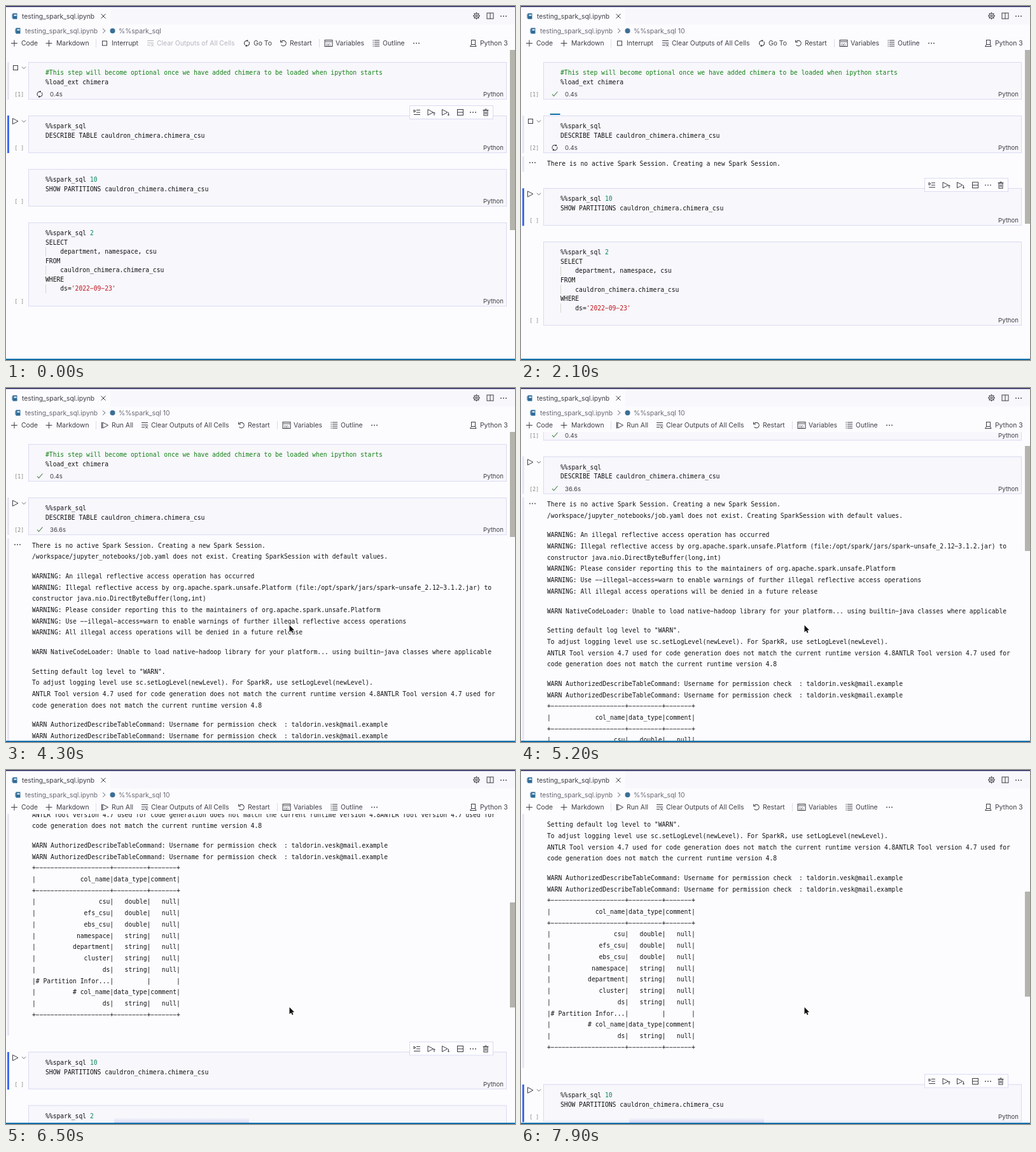
An HTML page with a canvas for the animation above (8 s loop, 800 by 556 pixels).

```html
<!DOCTYPE html>
<html lang="en">
<head>
<meta charset="utf-8">
<title>Notebook run</title>
<style>
html, body { margin: 0; width: 100%; height: 100%; overflow: hidden; background: #fcfcff; }
canvas { display: block; width: 800px; height: 556px; }
</style>
</head>
<body>
<canvas id="stage" width="800" height="556"></canvas>
<script>
const ctx = document.getElementById('stage').getContext('2d');
const LOOP = 8000, STEP = 100;
const VIEW = { top: 69, bottom: 554 };
const CODE = '9.68px "DejaVu Sans Mono", monospace';
const LABEL = '10.35px Inter, sans-serif';
const SMALL = '9.6px Inter, sans-serif';
const CHAR = 5.828, CODE_LINE = 14.55, OUT_LINE = 17.72, OUT_GAP = 30.6;
const C = {
  page: '#fcfcff', cell: '#f7f7fc', edge: '#dadaf2', ink: '#111', label: '#3d3d45',
  muted: '#666670', faint: '#b5b5bd', blue: '#3f6bf0', focus: '#86b5f2', bar: '#e6e6f6',
  accent: '#0e6fa8', green: '#138013', number: '#098658', string: '#c0141c', thumb: '#b4b4ad'
};

// Moments of the run, in ms
const T = { firstDone: 200, pointer: 900, click: 1100, run: 1700, progress: 2000, rush: 3300, done: 3800, arrow: 3700 };
const REVEAL = [[1900, 1], [2200, 2], [3300, 8], [3400, 13], [3500, 15], [3600, 29]];
const SCROLL = [[4900, 0], [5000, 8], [5100, 30], [5200, 64.5], [5300, 135], [5400, 220], [5500, 300],
  [5600, 360], [5700, 395], [6100, 395], [6300, 405], [6500, 410.5], [6700, 396], [7000, 359.5]];

const user = 'taldorin.vesk@mail.example';
const check = 'WARN AuthorizedDescribeTableCommand: Username for permission check  : ' + user;
const rule = '+' + [20, 9, 7].map(n => '-'.repeat(n)).join('+') + '+';
const row = (a, b, c) => '|' + a.padStart(20) + '|' + b.padStart(9) + '|' + c.padStart(7) + '|';
const header = row('col_name', 'data_type', 'comment');
const numbers = ['csu', 'efs_csu', 'ebs_csu'].map(n => row(n, 'double', 'null'));
const strings = ['namespace', 'department', 'cluster', 'ds'].map(n => row(n, 'string', 'null'));

// A leading newline marks a paragraph gap
const OUTPUT = [
  'There is no active Spark Session. Creating a new Spark Session.',
  '/workspace/jupyter_notebooks/job.yaml does not exist. Creating SparkSession with default values.',
  '\nWARNING: An illegal reflective access operation has occurred',
  'WARNING: Illegal reflective access by org.apache.spark.unsafe.Platform (file:/opt/spark/jars/spark-unsafe_2.12-3.1.2.jar) to',
  'constructor java.nio.DirectByteBuffer(long,int)',
  'WARNING: Please consider reporting this to the maintainers of org.apache.spark.unsafe.Platform',
  'WARNING: Use --illegal-access=warn to enable warnings of further illegal reflective access operations',
  'WARNING: All illegal access operations will be denied in a future release',
  '\nWARN NativeCodeLoader: Unable to load native-hadoop library for your platform... using builtin-java classes where applicable',
  '\nSetting default log level to "WARN".',
  'To adjust logging level use sc.setLogLevel(newLevel). For SparkR, use setLogLevel(newLevel).',
  'ANTLR Tool version 4.7 used for code generation does not match the current runtime version 4.8ANTLR Tool version 4.7 used for',
  'code generation does not match the current runtime version 4.8',
  '\n' + check, check,
  rule, header, rule, ...numbers, ...strings,
  '|# Partition Infor...|         |       |',
  row('# col_name', 'data_type', 'comment'), row('ds', 'string', 'null'), rule
];
let outY = 247 - OUT_LINE;
const LINES = OUTPUT.map(s => ({ text: s.trimStart(), y: outY += s[0] === '\n' ? OUT_GAP : OUT_LINE }));

// Each line is a list of [text, colour] runs
const plain = s => [[s, C.ink]];
const CELLS = [
  [[['#This step will become optional once we have added chimera to be loaded when ipython starts', C.green]],
    plain('%load_ext chimera')],
  [plain('%%spark_sql'), plain('DESCRIBE TABLE cauldron_chimera.chimera_csu')],
  [[['%%spark_sql ', C.ink], ['10', C.number]], plain('SHOW PARTITIONS cauldron_chimera.chimera_csu')],
  [[['%%spark_sql ', C.ink], ['2', C.number]], plain('SELECT'), plain('    department, namespace, csu'),
    plain('FROM'), plain('    cauldron_chimera.chimera_csu'), plain('WHERE'),
    [['    ds=', C.ink], ["'2022-09-23'", C.string]]]
];
const cellHeight = lines => 59 + (lines.length - 2) * CODE_LINE;

function lerpKeys(keys, t) {
  if (t <= keys[0][0]) return keys[0][1];
  for (let i = 1; i < keys.length; i++) {
    const [a, va] = keys[i - 1], [b, vb] = keys[i];
    if (t <= b) return va + (vb - va) * (t - a) / (b - a);
  }
  return keys[keys.length - 1][1];
}

function rect(x, y, w, h, color) {
  ctx.fillStyle = color;
  ctx.fillRect(x, y, w, h);
}
function frame(x, y, w, h, color) {
  ctx.strokeStyle = color;
  ctx.lineWidth = 1;
  ctx.strokeRect(x, y, w, h);
}
// Text is placed by the middle of its capitals
function text(s, x, y, font = LABEL, color = C.label) {
  ctx.font = font;
  ctx.fillStyle = color;
  ctx.fillText(s, x, y + 3.5);
}
// The code face has wide dashes, level with the plus sign
function code(s, x, y, color = C.ink) {
  text(s.replaceAll('-', '\u2212'), x, y, CODE, color);
}
function path(points, color = C.label, close = false, width = 1) {
  ctx.beginPath();
  points.forEach(([x, y]) => ctx.lineTo(x, y));
  if (close) ctx.closePath();
  ctx.strokeStyle = color;
  ctx.lineWidth = width;
  ctx.stroke();
}
function disc(x, y, r, color) {
  ctx.beginPath();
  ctx.arc(x, y, r, 0, 7);
  ctx.fillStyle = color;
  ctx.fill();
}
function arc(x, y, r, from, to, color = C.label) {
  ctx.beginPath();
  ctx.arc(x, y, r, from, to);
  ctx.strokeStyle = color;
  ctx.lineWidth = 1.1;
  ctx.stroke();
}

const icon = {
  plus(x, y) { path([[x - 5, y], [x + 5, y]]); path([[x, y - 5], [x, y + 5]]); },
  play(x, y) { path([[x - 4, y - 4.5], [x + 4.5, y], [x - 4, y + 4.5]], C.label, true); },
  stop(x, y) { frame(x - 3.5, y - 3.5, 7, 7, C.label); },
  close(x, y) { path([[x - 3.5, y - 3.5], [x + 3.5, y + 3.5]]); path([[x + 3.5, y - 3.5], [x - 3.5, y + 3.5]]); },
  down(x, y) { path([[x - 3, y - 1.5], [x, y + 1.5], [x + 3, y - 1.5]], C.muted); },
  right(x, y) { path([[x - 2, y - 3.5], [x + 2, y], [x - 2, y + 3.5]], C.muted); },
  tick(x, y) { path([[x - 4, y], [x - 1.5, y + 3], [x + 4.5, y - 4]], '#477a47', false, 1.1); },
  dots(x, y) { for (const d of [-4, 0, 4]) disc(x + d, y, 0.9, C.label); },
  sync(x, y, angle = 0) {
    arc(x, y, 4, angle + 2.4, angle + 4.9);
    arc(x, y, 4, angle - 0.7, angle + 1.8);
    for (const a of [angle + 4.9, angle + 1.8]) disc(x + 4 * Math.cos(a), y + 4 * Math.sin(a), 1.3, C.label);
  },
  restart(x, y) {
    arc(x, y, 4.2, -2.5, 2.5);
    path([[x - 4.5, y - 5], [x - 4.5, y - 1.5], [x - 1, y - 1.5]]);
  },
  clear(x, y, color) {
    path([[x - 5, y - 4], [x + 5, y - 4]], color);
    path([[x - 5, y - 0.5], [x + 5, y - 0.5]], color);
    path([[x - 5, y + 3], [x, y + 3]], color);
    path([[x + 1, y + 1], [x + 5, y + 5]], color);
    path([[x + 5, y + 1], [x + 1, y + 5]], color);
  },
  variables(x, y) {
    frame(x - 5.5, y - 5, 12, 10, C.label);
    path([[x - 5, y - 2.5], [x + 6, y - 2.5]]);
    text('(x)', x - 4, y + 1, '6px Inter, sans-serif');
  },
  outline(x, y) {
    for (const d of [-4, -1, 2, 5]) {
      rect(x - 5, y + d - 1, 1.5, 1, C.label);
      rect(x - 2.5, y + d - 1, 8, 1, C.label);
    }
  },
  notebook(x, y) {
    rect(x - 3.5, y - 4.5, 7, 9, '#2c6b98');
    rect(x - 1.5, y - 2.5, 4, 2, '#fff');
    rect(x - 4.5, y - 3, 1, 6, '#2c6b98');
  },
  gear(x, y) {
    arc(x, y, 3.7, 0, 7);
    arc(x, y, 1.5, 0, 7);
    for (let i = 0; i < 8; i++) {
      const c = Math.cos(i * Math.PI / 4), s = Math.sin(i * Math.PI / 4);
      path([[x + 3.7 * c, y + 3.7 * s], [x + 5.4 * c, y + 5.4 * s]], C.label, false, 1.5);
    }
  },
  split(x, y) { frame(x - 4.5, y - 4.5, 10, 9, C.label); path([[x + 0.5, y - 4.5], [x + 0.5, y + 4.5]]); },
  kernel(x, y) {
    frame(x - 2.5, y - 5, 6, 7, C.label);
    path([[x - 2.5, y + 2], [x - 4.5, y + 5], [x + 5, y + 5], [x + 3.5, y + 2]]);
  },
  trash(x, y) {
    frame(x - 3, y - 3, 6, 8, C.label);
    path([[x - 4.5, y - 3.5], [x + 4.5, y - 3.5]]);
    path([[x - 1.5, y - 5], [x + 1.5, y - 5]]);
    path([[x - 1, y - 1], [x - 1, y + 3]]);
    path([[x + 1, y - 1], [x + 1, y + 3]]);
  },
  runBy(x, y) {
    for (const d of [-3.5, 0, 3.5]) path([[x - (d > 0 ? 5 : 1), y + d], [x + 5, y + d]]);
    path([[x - 5, y - 4], [x - 2, y - 2], [x - 5, y]], C.label, true);
  },
  runPart(x, y, dir) {
    icon.play(x - 1, y);
    path([[x + 5, y], [x + 5, y + 5]]);
    path([[x + 3.5, y + 2.5 + dir], [x + 5, y + 2.5 + dir * 2.5], [x + 6.5, y + 2.5 + dir]]);
  }
};

function drawHeader(t, busy) {
  rect(0, 0, 800, VIEW.top, C.page);
  rect(164, 2, 636, 27, C.cell);
  rect(0, 0, 800, 1.5, '#20205a');
  icon.notebook(14, 16);
  text('testing_spark_sql.ipynb', 25, 16);
  icon.close(153, 16);
  icon.gear(739.5, 15.5);
  icon.split(760.5, 15.5);
  icon.dots(782, 16);

  icon.notebook(19, 39);
  text('testing_spark_sql.ipynb', 30, 39, LABEL, C.muted);
  icon.right(154, 39);
  disc(167.5, 39, 4, '#3a6f96');
  text(t < T.run ? '%%spark_sql' : '%%spark_sql 10', 177, 39, LABEL, C.muted);

  const y = 58.5, separator = x => rect(x, 52, 1, 13, '#dcdce6');
  const clearColor = t < REVEAL[0][0] ? C.faint : C.label;
  icon.plus(13, y); text('Code', 24, y);
  icon.plus(67.5, y); text('Markdown', 79, y);
  separator(141);
  if (busy) { icon.stop(155, y); text('Interrupt', 166, y); }
  else {
    icon.play(156, y); path([[150.5, 53.5], [150.5, 63.5]]);
    text('Run All', 166, y);
  }
  const clearX = busy ? 227 : 218;
  icon.clear(clearX, y, clearColor);
  text('Clear Outputs of All Cells', clearX + 10, y, LABEL, clearColor);
  if (busy) { icon.sync(378.5, y); text('Go To', 389, y); }
  const shift = busy ? 66 : 0;
  icon.restart(370 + shift, y); text('Restart', 380 + shift, y);
  separator(426 + shift);
  icon.variables(440.5 + shift, y); text('Variables', 452 + shift, y);
  icon.outline(515.5 + shift, y); text('Outline', 526 + shift, y);
  icon.dots(579 + shift, y);
  icon.kernel(734, y); text('Python 3', 745, y);
}

function drawCellTools(top) {
  const y = top - 5;
  rect(634, top - 16, 132, 22, '#fdfdff');
  frame(634.5, Math.round(top - 16) + 0.5, 131, 21, C.edge);
  icon.runBy(646, y);
  icon.runPart(668, y, -1);
  icon.runPart(690.5, y, 1);
  frame(709.5, y - 4.5, 9, 9, C.label); path([[709.5, y], [718.5, y]]);
  icon.dots(734, y);
  icon.trash(754, y);
}

// state: running, selected, hover, focused, order, time
function drawCell(lines, top, state) {
  const h = cellHeight(lines), y0 = Math.round(top) + 0.5;
  rect(35, top, 752, h, C.cell);
  frame(35.5, y0, 751, Math.round(h) - 1, state.focused ? C.focus : C.edge);
  if (state.selected) rect(2, top, 3, h, C.blue);
  else if (state.running || state.hover) rect(2, top, 3, h, C.bar);

  lines.forEach((runs, i) => {
    const y = top + 16.5 + i * CODE_LINE;
    let x = 62;
    if (runs[0][0].startsWith('  ')) rect(62, y - 7, 1, CODE_LINE, '#d8d8cc');
    for (const [s, color] of runs) {
      code(s, x, y, color);
      x += s.length * CHAR;
    }
  });

  if (state.running || state.selected || state.hover) {
    if (state.running) icon.stop(15, top + 9);
    else icon.play(14.5, top + 9);
    icon.down(28, top + 9);
  }
  const y = top + h - 8.5;
  text(`[${state.order || ' '}]`, 13.5, y, '8px "DejaVu Sans Mono", monospace', '#85857a');
  text('Python', 750, y, SMALL, C.label);
  if (state.time) {
    if (state.running) icon.sync(53, y, state.spin);
    else icon.tick(53, y);
    text(state.time, 69, y, SMALL, C.label);
  }
}

// Bit travels the cell width in 4 s, three times as wide at the middle
function drawProgress(seconds, top) {
  const p = seconds / 4 % 1, w = 15 * (3 - 2 * Math.abs(2 * p - 1));
  rect(42.5 + 737 * p - w / 2, top - 3, w, 2, C.accent);
}

function drawPointer(t) {
  if (t >= T.pointer && t < T.run) {
    path([[163, 183.5], [165, 183.5]]); path([[166, 183.5], [168, 183.5]]);
    path([[165.5, 184], [165.5, 194]], '#222');
    path([[163, 194.5], [165, 194.5]]); path([[166, 194.5], [168, 194.5]]);
  }
  if (t < T.arrow) return;
  const tip = [[0, 0], [0, 11], [2.6, 8.6], [4.3, 12.2], [6, 11.4], [4.4, 8], [7.6, 7.8]];
  path(tip.map(([x, y]) => [x + 445.5, y + 372.5]), '#fff', true, 2);
  ctx.fillStyle = '#111';
  ctx.fill();
}

function draw(t) {
  const running1 = t < T.firstDone;
  const running2 = t >= T.run && t < T.done;
  const busy = running1 || running2;
  const shown = REVEAL.reduce((n, [at, count]) => t >= at ? count : n, 0);
  const scroll = lerpKeys(SCROLL, t);
  const seconds = lerpKeys([[T.run, 0], [T.rush, 1.6], [T.done, 36.6]], t);
  const selected = t < T.run ? 1 : 2;
  const full = shown === LINES.length;
  const third = shown ? LINES[shown - 1].y + (full ? 58.8 : 39.3) : 256;
  const tops = [88, 172, third, third + 84];

  rect(0, 0, 800, 556, C.page);
  ctx.save();
  ctx.beginPath();
  ctx.rect(0, VIEW.top, 800, VIEW.bottom - VIEW.top);
  ctx.clip();
  ctx.translate(0, -scroll);

  const states = [
    { running: running1, order: 1, time: '0.4s' },
    { running: running2, hover: t >= T.done, focused: t >= T.click && t < T.run,
      order: t < T.run ? '' : 2, time: t < T.run ? '' : seconds.toFixed(1) + 's' },
    {}, {}
  ];
  CELLS.forEach((lines, i) => drawCell(lines, tops[i],
    { ...states[i], selected: i === selected, spin: t / 1000 * Math.PI }));

  if (shown) {
    rect(2, 236, 3, third - 26 - 236, C.bar);
    icon.dots(18, 246);
    LINES.slice(0, shown).forEach(line => code(line.text, 41, line.y));
  }
  if (states[1].focused) rect(125.5, 182, 1, 13, '#000');
  if (running2 && t >= T.progress) drawProgress(seconds - 0.34, tops[1]);
  drawCellTools(tops[selected]);
  ctx.restore();

  if (t >= 6200) {
    const glow = ctx.createLinearGradient(0, 546, 0, VIEW.bottom);
    glow.addColorStop(0, 'rgba(205,205,240,0)');
    glow.addColorStop(1, 'rgba(205,205,240,.7)');
    rect(170, 546, 212, VIEW.bottom - 546, glow);
  }

  const view = VIEW.bottom - VIEW.top;
  const ratio = view / (third + 576);
  rect(792, Math.round(VIEW.top + scroll * ratio), 8, Math.round(view * ratio), C.thumb);
  drawHeader(t, busy);
  rect(0, VIEW.bottom, 800, 2, C.accent);
  drawPointer(t);
}

function tick(now) {
  draw(Math.floor(now % LOOP / STEP) * STEP);
  requestAnimationFrame(tick);
}
draw(0);
requestAnimationFrame(tick);
</script>
</body>
</html>
```
